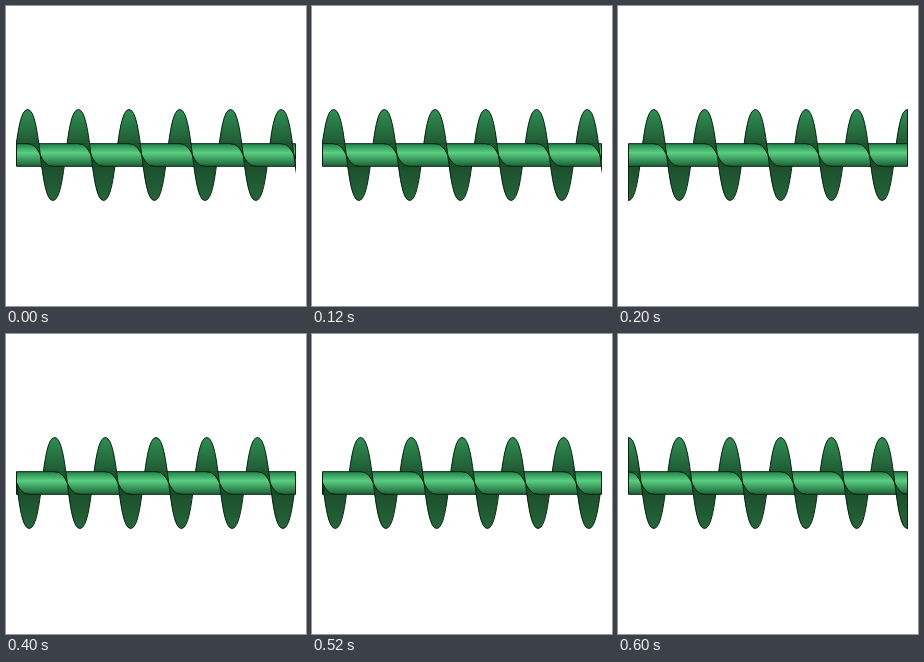
Animation, 300 px wide and 300 px high, one loop 800 ms. Source, as an HTML page with a canvas:

```html
<!DOCTYPE html>
<html>
<head>
<meta charset="utf-8">
<title>Screw conveyor</title>
<style>
html, body { margin: 0; width: 100%; height: 100%; overflow: hidden; background: #fff; }
canvas { display: block; }
</style>
</head>
<body>
<canvas width="300" height="300"></canvas>
<script>
const ctx = document.querySelector('canvas').getContext('2d');
const LEFT = 10.5, RIGHT = 289.5, MID = 149;
const OUTER = 45.5, INNER = 11.3;
const HALF = (RIGHT - LEFT) / 11; // half a turn
const BEND = HALF * 0.55;         // handle length of each half turn
const CRESTS = [21.6, 35.9, 48.6, 61.2]; // crest position for each step
const STEP = 200;

function gradient(radius, ...stops) {
  const g = ctx.createLinearGradient(0, MID - radius, 0, MID + radius);
  stops.forEach(s => g.addColorStop(...s));
  return g;
}
const bladeFill = gradient(OUTER, [0, '#2f8f52'], [0.5, '#194828'], [1, '#246639']);
const shaftFill = gradient(INNER, [0, '#208048'], [0.4, '#5acf82'], [1, '#1b6236']);

// Adds the helix edge from half turn i to half turn j
function edge(path, crest, r, i, j) {
  const d = Math.sign(j - i);
  for (; i !== j; i += d) {
    const x = crest + i * HALF, end = x + d * HALF;
    const side = i % 2 ? r : -r;
    path.lineTo(x, MID + side);
    path.bezierCurveTo(x + d * BEND, MID + side, end - d * BEND, MID - side, end, MID - side);
  }
}

function ribbon(crest, i, j) {
  const path = new Path2D();
  edge(path, crest, OUTER, i, j);
  edge(path, crest, INNER, j, i);
  path.closePath();
  return path;
}

function paint(path, fill) {
  ctx.fillStyle = fill;
  ctx.fill(path);
  ctx.stroke(path);
}

function clipped(area, drawing) {
  ctx.save();
  ctx.clip(area);
  drawing();
  ctx.restore();
}

function box(x, y, w, h) {
  const path = new Path2D();
  path.rect(x, y, w, h);
  return path;
}

const shaft = box(LEFT, MID - INNER, RIGHT - LEFT, 2 * INNER);
const span = box(LEFT - 0.5, 0, RIGHT - LEFT + 1, 300);
const band = box(LEFT - 0.5, MID - INNER - 0.5, RIGHT - LEFT + 1, 2 * INNER + 1);
const frameBox = box(LEFT, -10, RIGHT - LEFT, 320);

function draw(crest) {
  ctx.fillStyle = '#fff';
  ctx.fillRect(0, 0, 300, 300);
  ctx.strokeStyle = '#08220f';
  ctx.lineWidth = 1;

  const whole = ribbon(crest, -4, 14);
  clipped(span, () => {
    paint(whole, bladeFill);
    clipped(whole, () => ctx.stroke(frameBox)); // cut ends of the blade
  });
  paint(shaft, shaftFill);
  clipped(band, () => {
    for (let i = -4; i < 14; i += 2) paint(ribbon(crest, i, i + 1), bladeFill);
  });
}

function frame() {
  draw(CRESTS[Math.floor(performance.now() / STEP) % CRESTS.length]);
  requestAnimationFrame(frame);
}
frame();
</script>
</body>
</html>
```
